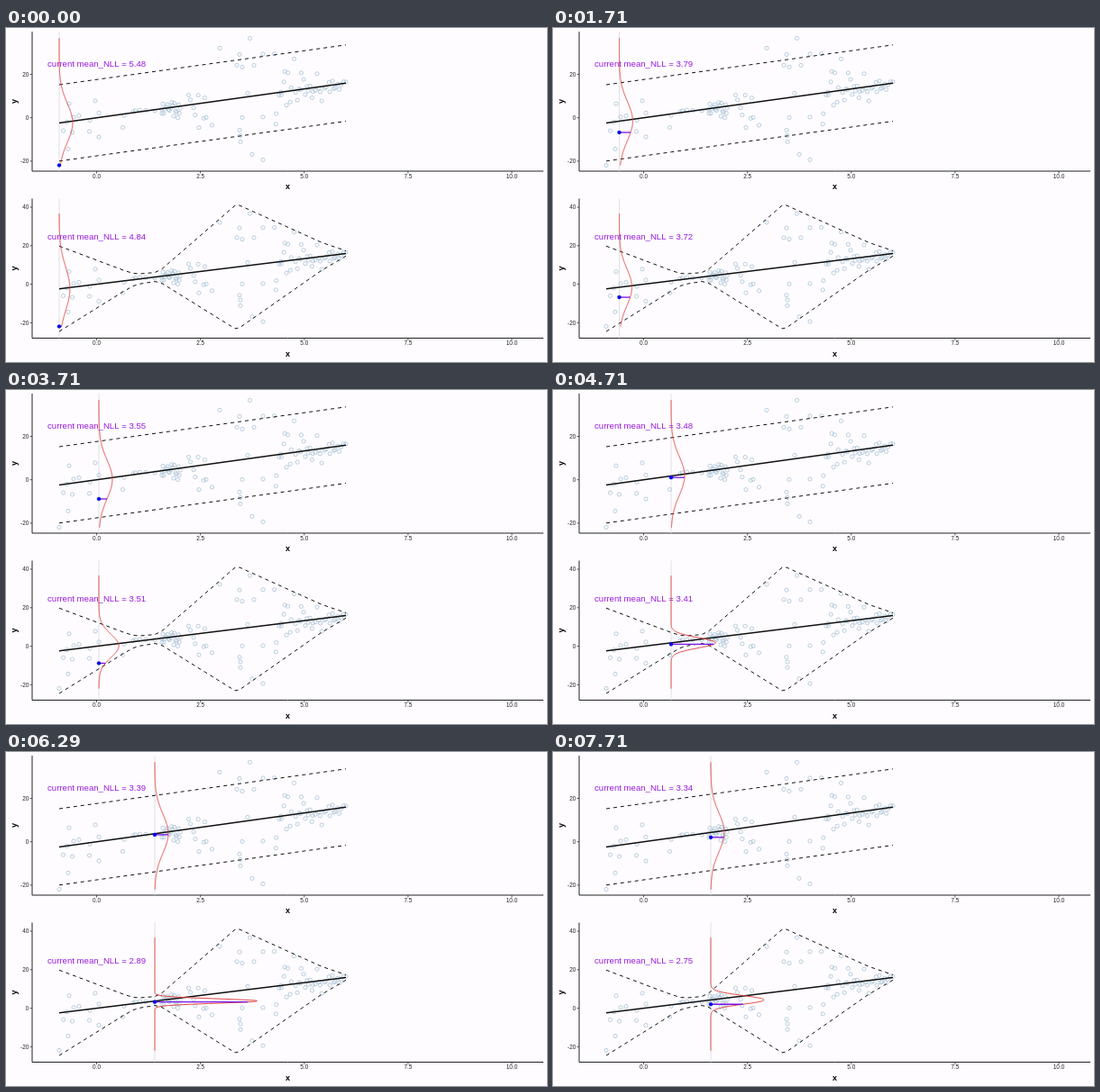
These frames come from a looping animation (600x371 px, 8000 ms). An HTML page with a canvas:

```html
<!DOCTYPE html>
<html lang="en">
<head>
<meta charset="utf-8">
<title>Mean negative log-likelihood</title>
<style>
html, body { margin: 0; width: 100%; height: 100%; overflow: hidden; background: #fefcff; }
canvas { display: block; }
</style>
</head>
<body>
<canvas id="c" width="600" height="371"></canvas>
<script>
const ctx = document.getElementById('c').getContext('2d');
const FONT = '"Liberation Sans", Arial, sans-serif';
const LEFT = 59, RIGHT = 377;

// Key points of the standard deviation along x, joined linearly
const spread = [
  [59, 11.3], [131, 2.73], [141, 1.68], [148.5, 1.34], [165, 1.18], [172.5, 1.84],
  [175, 2.27], [254, 16.3], [259, 16.2], [350, 3.7], [RIGHT, 0.7]];

const mean = x => -2.37 + 0.0577 * (x - LEFT);

function varying(x) {
  const i = Math.max(1, spread.findIndex(p => p[0] >= x));
  const [x0, s0] = spread[i - 1], [x1, s1] = spread[i];
  return s0 + (s1 - s0) * (x - x0) / (x1 - x0);
}

const toPoint = ([x, y]) => ({ x, v: (99.3 - y) / 2.41 });

// Points visited one by one
const path = [
  [59, 152.1], [63.5, 113.7], [67.5, 104], [69, 134], [70, 83.7], [73.5, 115.6],
  [75, 98.5], [81, 97], [92.5, 114.5], [93, 102], [99, 80.5], [103, 120.6],
  [103, 94], [129.5, 110.1], [131, 96.8], [141, 92.5], [143.5, 91.5], [148.5, 90.8],
  [155, 91], [165, 91.5], [172.5, 89.8], [173, 94.5], [174, 84], [175, 94.4]].map(toPoint);

const outliers = [
  [222, 99], [228.5, 107.5], [237, 22], [256, 41], [262, 43], [259, 29], [270.5, 11],
  [275, 41], [285, 28.5], [259, 113], [260, 119], [260, 126], [262, 99], [268, 72],
  [273, 140], [285, 146], [285, 98.5]].map(toPoint);

let seed = 7;
const random = () => (seed = (seed * 16807) % 2147483647) / 2147483647;

function cluster(from, to, count) {
  return Array.from({ length: count }, (_, i) => {
    const x = from + (to - from) * (i + random()) / count;
    const noise = 1.4 * (random() + random() + random() - 1.5);
    return { x, v: mean(x) + noise * varying(x) };
  });
}

const points = [...path, ...outliers,
  ...cluster(176, 194, 16), ...cluster(200, 222, 8),
  ...cluster(296, 349, 29), ...cluster(350, RIGHT, 13)];

const panels = [
  { top: 4, bottom: 159, zero: 99.7, unit: 2.41, ticks: [20, 0, -20], textY: 43.2, sd: () => 8.975 },
  { top: 189.5, bottom: 344.5, zero: 284.6, unit: 2.14, ticks: [40, 20, 0, -20], textY: 235.2, sd: varying }];

// Running mean of the negative log-likelihood over the visited points
for (const p of panels) {
  let sum = 0;
  p.nll = path.map(({ x, v }, i) => {
    const sd = p.sd(x), z = (v - mean(x)) / sd;
    sum += Math.log(sd * Math.sqrt(2 * Math.PI)) + z * z / 2;
    return sum / (i + 1);
  });
}

function stroke(pts, color, width, dash = []) {
  ctx.beginPath();
  pts.forEach(([x, y]) => ctx.lineTo(x, y));
  ctx.strokeStyle = color;
  ctx.lineWidth = width;
  ctx.setLineDash(dash);
  ctx.stroke();
  ctx.setLineDash([]);
}

function text(str, x, y, font, color, align = 'center') {
  ctx.font = `${font} ${FONT}`;
  ctx.fillStyle = color;
  ctx.textAlign = align;
  ctx.fillText(str, x, y);
}

function sample(from, to, step, fn) {
  const out = [];
  for (let a = from; a < to; a += step) out.push(fn(a));
  out.push(fn(to));
  return out;
}

function drawAxes(p) {
  stroke([[29, p.top], [29, p.bottom], [596, p.bottom]], '#222', 1);
  for (const v of p.ticks) {
    const y = p.zero - v * p.unit;
    stroke([[26.5, y], [29, y]], '#333', 0.8);
    text(v, 25.3, y + 2.2, '6.4px', '#222', 'right');
  }
  for (let v = 0; v <= 10; v += 2.5) {
    const x = 100.5 + 46.05 * v;
    stroke([[x, p.bottom], [x, p.bottom + 2.5]], '#333', 0.8);
    text(v.toFixed(1), x, p.bottom + 7.7, '6.4px', '#222');
  }
  text('x', 312.5, p.bottom + 20, 'bold 9px', '#000');
  ctx.save();
  ctx.translate(12, (p.top + p.bottom) / 2);
  ctx.rotate(-Math.PI / 2);
  text('y', 0, 0, 'bold 9px', '#000');
  ctx.restore();
}

function drawPanel(p, step) {
  const Y = v => p.zero - v * p.unit;
  const { x, v } = path[step];
  const sd = p.sd(x);
  const density = u => 134 / sd * Math.exp(-(((u - mean(x)) / sd) ** 2) / 2);

  drawAxes(p);
  stroke([[x, p.top], [x, p.bottom]], '#dedede', 0.9);

  ctx.strokeStyle = '#9dbace';
  ctx.lineWidth = 0.7;
  for (const q of points) {
    ctx.beginPath();
    ctx.arc(q.x, Y(q.v), 2.1, 0, 7);
    ctx.stroke();
  }

  for (const side of [-1.96, 1.96])
    stroke(sample(LEFT, RIGHT, 1, a => [a, Y(mean(a) + side * p.sd(a))]), '#111', 1, [4, 4]);
  stroke([[LEFT, Y(mean(LEFT))], [RIGHT, Y(mean(RIGHT))]], '#111', 1.5);
  stroke(sample(-22, 36.7, 0.2, u => [x + density(u), Y(u)]), '#e0403c', 0.95);

  stroke([[x, Y(v)], [x + density(v), Y(v)]], '#7a10e8', 1.3);
  ctx.beginPath();
  ctx.arc(x, Y(v), 2.1, 0, 7);
  ctx.fillStyle = '#0000f0';
  ctx.fill();

  text('current mean_NLL = ' + p.nll[step].toFixed(2), 100.6, p.textY, '9.6px', '#961adc');
}

// Three steps per second, the middle one held longer
function stepAt(ms) {
  const r = ms % 1000;
  return 3 * Math.floor(ms / 1000) + (r >= 290) + (r >= 710);
}

const start = performance.now();
function frame() {
  const step = stepAt((performance.now() - start) % 8000);
  ctx.fillStyle = '#fefcff';
  ctx.fillRect(0, 0, 600, 371);
  for (const p of panels) drawPanel(p, step);
  requestAnimationFrame(frame);
}
frame();
</script>
</body>
</html>
```
